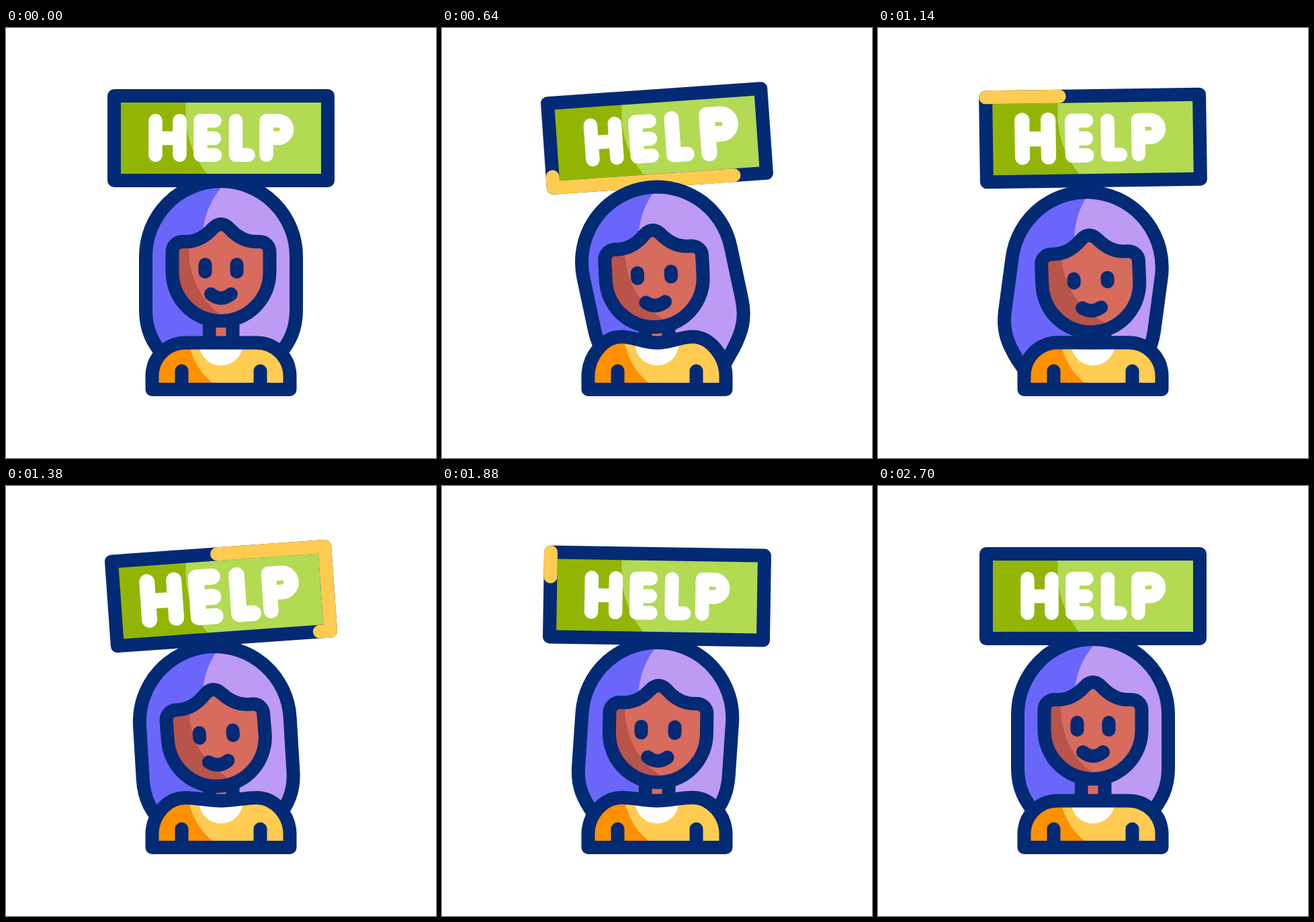
Animation of 640 by 640 pixels, one loop 3.02 s. Source, as an HTML page:

```html
<!DOCTYPE html>
<html lang="en">
<head>
<meta charset="utf-8">
<title>Help</title>
<style>
html, body { margin: 0; width: 100%; height: 100%; overflow: hidden; background: #fff; }
svg { display: block; width: 100vw; height: 100vh; }
.line { fill: none; stroke: #032a75; stroke-width: 20; stroke-linecap: round; stroke-linejoin: round; }
.bar { fill: none; stroke: #ffcb51; stroke-width: 20; stroke-linecap: round; stroke-linejoin: round; }
.word { fill: none; stroke: #fff; stroke-width: 20.6; stroke-linecap: round; stroke-linejoin: round; }
</style>
</head>
<body>
<svg viewBox="0 0 640 640" role="img" aria-label="Person under a sign that says HELP">
  <defs>
    <path id="boardShape" d="M161 101H479V227H161Z"/>
    <path id="hairShape" d="M208 340A112 112 0 0 1 432 340V420C432 450 422 468 404 490L388 508H252L236 490C218 468 208 450 208 420Z"/>
    <path id="faceShape" d="M247.5 363V333A15 15 0 0 1 262.500 318H268C284 318 298 309 308 298Q320 286 332 298C342 309 356 318 372 318H377.500A15 15 0 0 1 392.500 333V363A72.500 73 0 0 1 247.500 363Z"/>
    <path id="bodyShape"/>
    <clipPath id="boardClip"><use href="#boardShape" class="spin"/></clipPath>
    <clipPath id="hairClip"><use href="#hairShape" class="hair"/></clipPath>
    <clipPath id="faceClip"><use href="#faceShape" class="head"/></clipPath>
    <clipPath id="bodyClip"><use href="#bodyShape"/></clipPath>
  </defs>

  <g clip-path="url(#boardClip)">
    <path fill="#b2da53" d="M100 40H540V300H100Z"/>
    <path fill="#92b505" d="M267.500 40V130C267.500 165 282 195 299 217L314 240V300H100V40Z"/>
  </g>
  <g class="spin">
    <use href="#boardShape" class="line"/>
    <path class="bar" d="M161 101H479V227H161V101"/>
    <path class="bar" d="M161 101H479V227H161V101"/>
    <path class="word" d="M222.500 138V189M258.500 138V189M222.500 164H258.500"/>
    <path class="word" d="M310.500 138H289.500V189H311M289.500 164H310"/>
    <path class="word" d="M342 138V189H360.500"/>
    <path class="word" d="M387.500 189V138H405A13 13 0 0 1 405 164H388"/>
  </g>

  <g clip-path="url(#hairClip)">
    <path fill="#bd9bf4" d="M100 180H540V560H100Z"/>
    <path fill="#6a66fa" d="M330 180V228C300 255 292 290 292 320V560H100V180Z"/>
  </g>
  <use href="#hairShape" class="hair line"/>

  <path fill="#d66b5e" d="M302 420H338V470H302Z"/>
  <path class="line" d="M302.500 430V466M337.500 430V466"/>

  <g clip-path="url(#bodyClip)">
    <path fill="#ffcb51" d="M200 440H440V550H200Z"/>
    <path fill="#ff9000" d="M200 440H270V460C275 490 288 514 310 530V550H200Z"/>
    <circle cx="320" cy="470" r="32.500" fill="#fff"/>
  </g>
  <use href="#bodyShape" class="line"/>
  <path class="line" d="M261.500 510.500V538M378.500 510.500V538"/>

  <g clip-path="url(#faceClip)">
    <path fill="#d66b5e" d="M200 260H440V480H200Z"/>
    <path fill="#b8544a" d="M200 260H272V328C272 370 290 405 318 426Q331 436 345 443L360 480H200Z"/>
  </g>
  <g class="head">
    <use href="#faceShape" class="line"/>
    <path id="eyes" class="line"/>
    <path id="mouth" class="line"/>
  </g>
</svg>
<script>
const all = sel => [...document.querySelectorAll(sel)];
const byId = id => document.getElementById(id);
const LOOP = 3020, STEP = 20, LAST = 2700;
const RUN = 960, TRIM = 820, LAG = 200, EDGE = 888;

const ease = u => { u = Math.min(1, Math.max(0, u)); return u * u * (3 - 2 * u); };

// keys: time, value, time, value ...
function track(keys, t) {
  for (let i = 2; i < keys.length; i += 2) {
    if (t < keys[i]) {
      const [t0, v0, t1, v1] = keys.slice(i - 2, i + 2);
      return v0 + (v1 - v0) * ease((t - t0) / (t1 - t0));
    }
  }
  return keys[keys.length - 1];
}

const swing = [0, 0, 490, -10, 870, 7.5, 1310, -5, 1625, 2.5, 2060, 0];
const tilt = [0, 0, 420, -7.6, 930, 5, 1290, -6.5, 1640, 5.6, 2080, -2.6, 2600, 0];
const drop = [0, 0, 330, 23, 870, 0, 1200, 18, 1600, 0.5, 2040, 7, 2500, 0];
const sway = [0, 0, 240, 0, 630, -9.5, 1110, 10, 1590, -5, 1960, 4, 2320, -4, 2690, 0];
const shrug = [0, 0, 60, 0, 580, 9.5, 1080, 0, 1580, 7, 2400, 0];
const lively = [0, 0, 220, 1, 2000, 1, 2690, 0];

const spins = all('.spin'), hairs = all('.hair'), heads = all('.head');
const bars = all('.bar'), letters = all('.word');
const place = (list, value) => list.forEach(el => el.setAttribute('transform', value));

function drawBar(el, p) {
  const from = EDGE * ease((p - LAG) / TRIM), to = EDGE * ease(p / TRIM);
  const len = to - from;
  el.style.display = len > 0.5 ? '' : 'none';
  el.setAttribute('stroke-dasharray', `${len} 2000`);
  el.setAttribute('stroke-dashoffset', -from);
}

function drawLetter(el, i, t) {
  const pulse = run => ease(1 - Math.abs(t - run * RUN - 320 - 80 * i) / 280);
  const s = 1 + 0.16 * (pulse(0) + pulse(1));
  el.setAttribute('transform', `translate(320 164) scale(${s}) translate(-320 -164)`);
}

function draw(t) {
  place(spins, `rotate(${track(swing, t)} 320 164)`);
  bars.forEach((el, i) => drawBar(el, t - i * RUN));
  letters.forEach((el, i) => drawLetter(el, i, t));

  const dy = track(drop, t), k = dy / 23, p = track(lively, t);
  const head = `translate(0 ${dy}) rotate(${track(tilt, t)} 320 449)`;
  place(heads, head);
  place(hairs, `${head} rotate(${track(sway, t)} 320 310)`);

  const gap = 23.5 + 1.5 * p, half = 5.5 - 3.7 * k, ey = 357.5 + 2 * k;
  const eye = x => `M${x} ${ey - half}V${ey + half}`;
  byId('eyes').setAttribute('d', eye(320 - gap) + eye(320 + gap));

  const w = 15 - 1.5 * k, my = 396 + 2 * p + 2.5 * k;
  byId('mouth').setAttribute('d', `M${320 - w} ${my}Q320 ${my + 12 - 4 * k} ${320 + w} ${my}`);

  const top = 468.5 - track(shrug, t);
  byId('bodyShape').setAttribute('d',
    `M217.500 538V518C217.500 490.500 239.500 ${top} 267 ${top}C285 ${top} 300 468.500 320 468.500` +
    `C340 468.500 355 ${top} 373 ${top}C400.500 ${top} 422.500 490.500 422.500 518V538Z`);
}

const start = performance.now();
function tick() {
  const t = (performance.now() - start) % LOOP;
  draw(Math.min(LAST, Math.floor(t / STEP) * STEP));
  requestAnimationFrame(tick);
}
tick();
</script>
</body>
</html>
```
